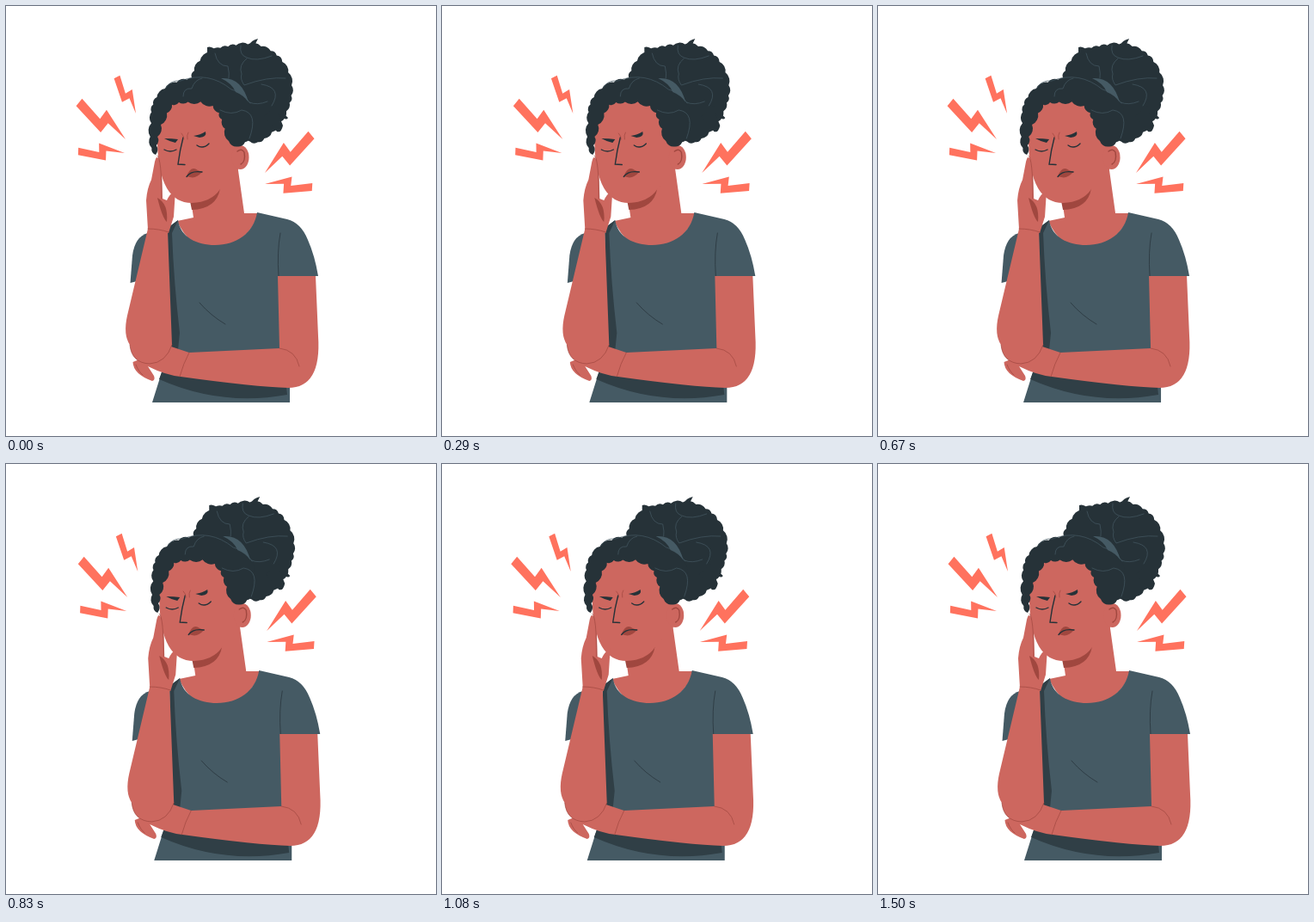
Animation, 500 px wide and 500 px high, one loop 1540 ms. Source, as an HTML page:

```html
<!DOCTYPE html>
<html lang="en">
<head>
<meta charset="utf-8">
<title>Headache</title>
<style>
html, body { margin: 0; height: 100%; overflow: hidden; background: #fff; }
svg { display: block; width: 100vw; height: 100vh; }
.skin { fill: #cd675f; }
.shade { fill: #a0473f; }
.shirt { fill: #455a64; }
.fold { fill: #303f46; }
.dark { fill: #263238; }
.line, .crease, .curl { fill: none; stroke-linecap: round; stroke-width: .7; }
.line { stroke: #263238; }
.crease { stroke: #a0473f; }
.curl { stroke: #455a64; }
.face { stroke-width: 1.4; }
</style>
</head>
<body>
<svg viewBox="0 0 500 500">
<g id="figure">
  <g id="bolts" fill="#ff725e"></g>

  <path class="dark bumpy" d="M216 84C222 62 236 48 262 47C302 36 328 62 332 92C335 122 306 158 286 160Z"/>
  <path class="dark" d="M234 58L234 48Q240 46 246 54ZM283 45Q285 40 293 38L288 48ZM314 116L328 130Q325 135 316 124L322 139Q320 148 315 146L300 128Z"/>
  <path class="curl" d="M243 55Q246 70 258 70Q260 79 259 84M273 46Q271 57 280 60Q291 65 309 58M280 61Q270 69 274 79Q272 85 277 92Q304 82 325 84M297 91Q322 95 309 116M283 112Q292 116 304 111"/>

  <!-- neck and shirt -->
  <path class="skin" d="M214 218L218 246 199 250Q214 284 245 281Q281 277 294 241H277L269 184Z"/>
  <path class="shade" d="M214 227Q238 226 249 212Q245 236 216 237Z"/>
  <path class="shirt" d="M165 264Q150 268 147 290L144.500 322 190 310Z"/>
  <path class="shirt" d="M200 249C203 269 222 278 243 278C268 278 288 264 292 240L327 248Q343 252 351 272Q359 290 363 314H330V461H170L181 426 188 400V258Z"/>
  <path class="fold" d="M200 249L188 258 191 400H200L202 380Q195 320 193 264Z"/>
  <path class="fold" d="M181 426L326 443 327 452Q250 466 178 434Z"/>
  <path class="line" d="M225 345Q238 360 255 370M319 264Q315 286 317 314"/>

  <!-- folded arm -->
  <path class="skin" d="M316 314H360L363 384Q367 444 328 444Q290 443 203 431Q185 429 165 419L172 430Q174 435 170 436Q148 428 147.500 414L192 396 213 403 318 398Z"/>
  <path class="crease" d="M318 398Q337 400 341 419M213 403Q206 416 202 431M151 417Q154 425 159 429"/>

  <!-- head -->
  <path class="skin" d="M190 108Q174 130 176 160Q178 229 216 229Q239 228 249 213L270 190 268 130 238 104Z"/>
  <ellipse class="skin" cx="272.500" cy="176" rx="10" ry="14"/>
  <path class="crease face" d="M269 169Q274 165 277 170Q279 181 273 184"/>
  <path class="dark bumpy" d="M174 173C163 160 170 145 169 130C168 105 188 87 216 85C262 80 290 112 287 138Q286 160 263 165C257 158 255 136 246 121C236 108 218 111 205 112C184 111 190 128 180 138Q175 150 174 173Z"/>
  <path class="shirt" d="M250 84Q274 82 282 112Q277 104 267 100Q263 90 250 84Z"/>
  <path class="curl" d="M186 95Q191 86 203 87Q235 75 262 97Q275 100 284 113M206 105Q206 95 216 96Q219 86 228 84M249 121Q262 128 274 121Q294 124 283 154"/>
  <path class="dark" d="M184 154Q193 154 200 155L197 159Q189 157 184 154ZM218 151Q226 150 232 146Q234 152 225 153Z"/>
  <path class="line face" d="M206 153Q202 168 200 184L208 184.500M184 167Q191 171 198 167M222 162Q229 167 236 160"/>
  <path class="crease" d="M204 148Q207 151 207 155M211 155Q210 150 212 147"/>
  <path class="shade" d="M210 198Q215 185 223 191L228 193Q221 201 214 199Z"/>
  <path class="line face" d="M210 198.500Q215 191 228 193"/>

  <!-- raised arm -->
  <path class="skin" d="M165 259L141 360Q136 382 144 394Q146 415 167 416Q186 415 193 394L188 262Z"/>
  <path class="skin" d="M165 260L163 226Q164 212 169 202L173 181Q176 168 181 188L182 224 187 226Q190 219 197 214L195 245 189 264Z"/>
  <path class="shade" d="M176 223Q189 230 187 251Q182 247 176 223Z"/>
  <path class="crease" d="M144 394Q146 415 167 416Q186 415 193 394M176 174Q181 177 181 224M165 259Q178 259 189 263"/>
</g>
</svg>
<script>
const figure = document.getElementById('figure');

// Turn a smooth outline into curls: arcs over slightly uneven steps.
for (const path of document.querySelectorAll('.bumpy')) {
  const total = path.getTotalLength(), count = Math.round(total / 12);
  let last = path.getPointAtLength(0), d = `M${last.x} ${last.y}`;
  for (let i = 1; i <= count; i++) {
    const jitter = i < count ? .25 * Math.sin(i * 5) : 0;
    const p = path.getPointAtLength((i + jitter) / count * total);
    const r = Math.hypot(p.x - last.x, p.y - last.y) * .8;
    d += `A${r} ${r} 0 0 1 ${p.x} ${p.y}`;
    last = p;
  }
  path.setAttribute('d', d + 'Z');
}

// One unit bolt, laid from its blunt end to its tip; side -1 mirrors it.
function bolt(x, y, tipX, tipY, side) {
  const dx = tipX - x, dy = tipY - y;
  document.getElementById('bolts').innerHTML +=
    `<path d="M0-.08L.45 0 .44-.19 1 0 .6-.03 .6.17 0 .08Z"
      transform="matrix(${dx} ${dy} ${-dy * side} ${dx * side} ${x} ${y})"/>`;
}
bolt(85, 112, 139, 155, 1);
bolt(129, 82.5, 151, 125, 1);
bolt(84, 169, 138, 171, 1);
bolt(355, 150, 301, 194, -1);
bolt(356, 210.5, 301, 207, -1);

// Sideways shake: linear between tenths of the cycle, mirrored at its middle.
const sway = [0, -1, 2, -4, 4, -4];
const LOOP = 1540, CYCLE = 1500, STEP = 1000 / 24, LEAD = 30;

function offset(time) {
  const pos = 5 - Math.abs(time % CYCLE / CYCLE * 10 - 5);
  const i = Math.min(4, Math.floor(pos));
  return sway[i] + (sway[i + 1] - sway[i]) * (pos - i);
}
function draw() {
  const step = Math.min(36, Math.floor(performance.now() % LOOP / STEP + .13));
  const x = offset(step * STEP + LEAD) - offset(LEAD);
  figure.setAttribute('transform', `translate(${x})`);
  requestAnimationFrame(draw);
}
draw();
</script>
</body>
</html>
```
